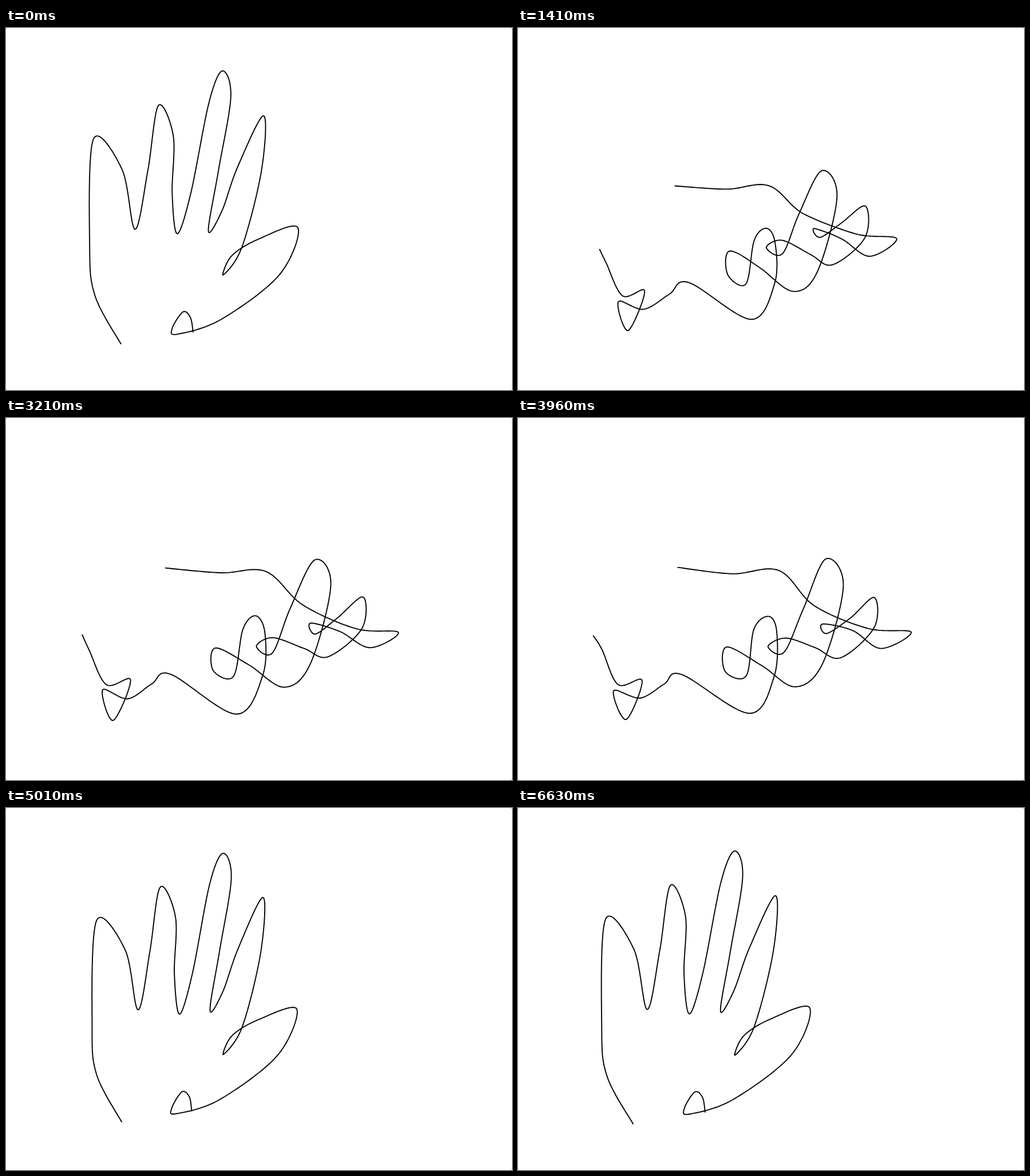
Write an HTML page that moves like this. It is 884 by 634 pixels and loops after 6.66 s.

```html
<!DOCTYPE html>
<html lang="en">
<head>
<meta charset="utf-8">
<title>Hand line drawing</title>
<style>
  html, body { margin: 0; width: 100%; height: 100%; overflow: hidden; background: #777; }
  svg { display: block; width: 884px; height: 634px; background: #fff; border-radius: 2px; }
  path { fill: none; stroke: #000; stroke-width: 1.9; stroke-linejoin: round; }
</style>
</head>
<body>
<svg viewBox="0 0 884 634"><path id="line"/></svg>
<script>
const LOOP = 6660, CLOSE_AT = 870, OPEN_AT = 4220, EASE = 180;
const WOBBLE = 0.9, SAMPLES = 700;

const parse = text => text.trim().split(/\s+/).map(pair => pair.split(',').map(Number));

// Key points, one row per finger
const open = parse(`
  201,553 155,470 147,380 152,195
  203,248 226,352 247,250 267,135
  292,190 290,290 300,360 322,290 355,130 378,76
  392,120 372,250 353,356 377,320 405,245 449,153
  447,250 412,384 379,432 395,400 440,369 510,350
  478,432 375,510 300,537 290,525 309,498 323,507 326,533`);

const closed = parse(`
  278,262 375,272 455,268 518,328 612,369 686,375
  635,403 584,373 532,360 540,378 580,350 623,314
  622,368 563,419 520,403 467,385 437,400 465,411 497,335 538,248
  568,293 532,430 485,471 425,433 365,402 362,443 398,452 413,370 437,347
  452,375 448,452 403,518 287,449 255,466
  213,491 168,477 188,529 217,459 175,467 146,406 132,380`);

// 0 = open hand, 1 = closed hand
function closure(t) {
  if (t < CLOSE_AT) return 0;
  if (t < OPEN_AT) return 1 - Math.exp((CLOSE_AT - t) / EASE);
  return Math.exp((OPEN_AT - t) / EASE);
}

const wobble = (keys, t) => keys.map(([x, y], i) => [
  x + WOBBLE * Math.sin(t / 260 + i * 2.4),
  y + WOBBLE * Math.sin(t / 260 + i * 3.7 + 1)
]);

// Point on a Catmull-Rom spline, u from 0 to 1 along the whole curve
function along(keys, u) {
  const last = keys.length - 1;
  const i = Math.min(Math.floor(u * last), last - 1), s = u * last - i;
  const [a, b, c, d] = [i - 1, i, i + 1, i + 2].map(n => keys[Math.max(0, Math.min(last, n))]);
  return [0, 1].map(k => b[k] + s / 2 * (c[k] - a[k]
    + s * (2 * a[k] - 5 * b[k] + 4 * c[k] - d[k]
    + s * (3 * (b[k] - c[k]) + d[k] - a[k]))));
}

function outline(t) {
  const k = closure(t), from = wobble(open, t), to = wobble(closed, t);
  return Array.from({ length: SAMPLES + 1 }, (_, i) => {
    const p = along(from, i / SAMPLES), q = along(to, i / SAMPLES);
    return p.map((v, n) => (v + (q[n] - v) * k).toFixed(2));
  });
}

const line = document.getElementById('line');
const start = performance.now();

function draw() {
  const t = (performance.now() - start) % LOOP;
  line.setAttribute('d', 'M' + outline(t).join('L'));
  requestAnimationFrame(draw);
}
draw();
</script>
</body>
</html>
```
